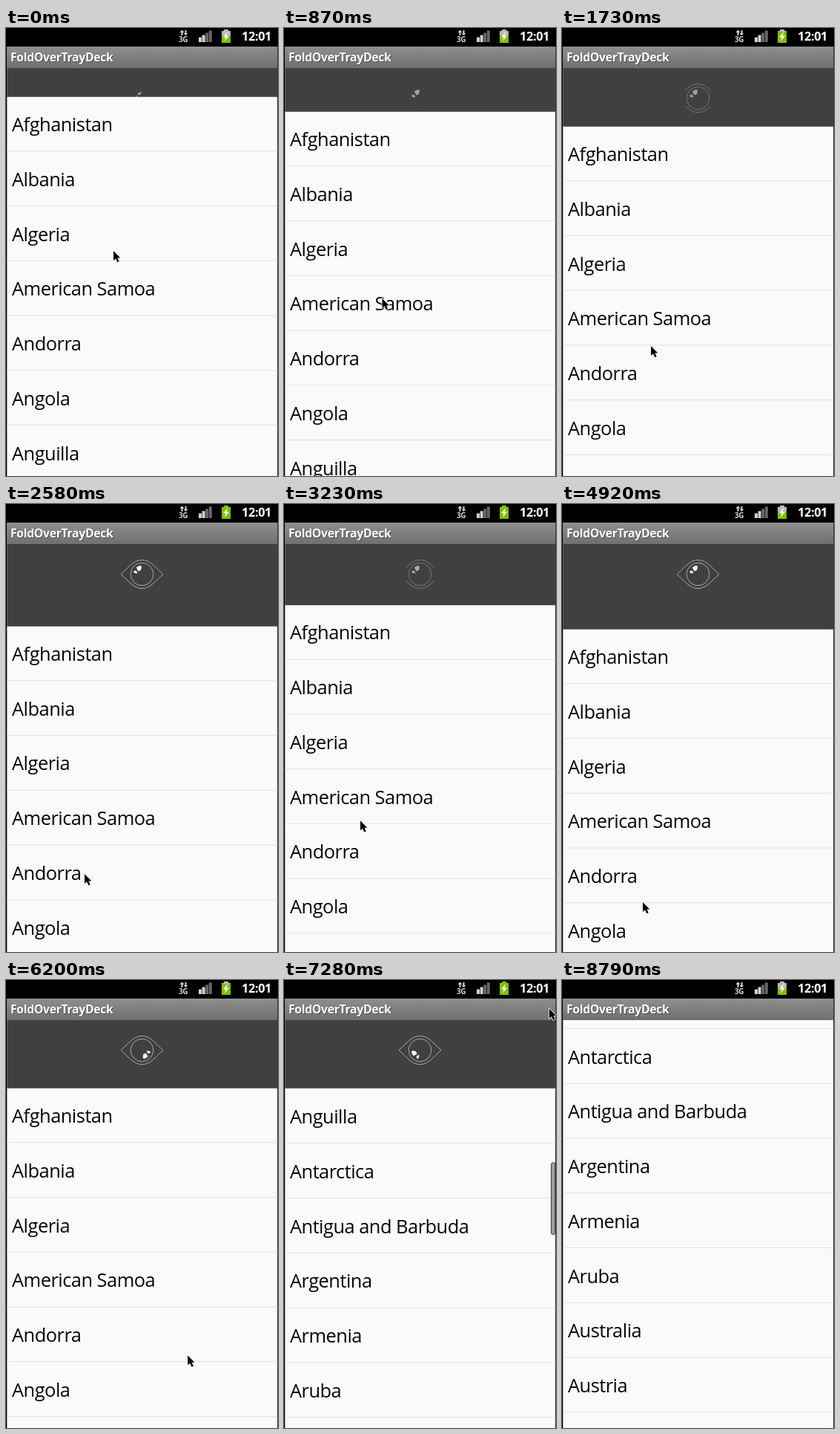
An HTML page for the animation above (9370 ms loop, 367x603 px).

```html
<!DOCTYPE html>
<html lang="en">
<head>
<meta charset="utf-8">
<title>Pull to refresh list</title>
<style>
  html, body { margin: 0; width: 100%; height: 100%; overflow: hidden; background: #000; }
  svg { display: block; }
  text { font-family: "Open Sans", "Noto Sans", sans-serif; }
  .bold { font-weight: 700; fill: #fff; letter-spacing: -.35px; }
  .title { font-size: 15.8px; }
  .shade { fill: #222; opacity: .5; }
  #rows text { font-size: 25.4px; letter-spacing: -.5px; fill: #050505; }
</style>
</head>
<body>
<svg width="367" height="603" viewBox="0 0 367 603">
  <defs>
    <linearGradient id="bar" x2="0" y2="1">
      <stop stop-color="#8f8f8f"/>
      <stop offset="1" stop-color="#6f6f6f"/>
    </linearGradient>
    <linearGradient id="thumbFill">
      <stop stop-color="#777"/>
      <stop offset=".5" stop-color="#b0b0b0"/>
      <stop offset="1" stop-color="#777"/>
    </linearGradient>
    <clipPath id="reveal"><circle id="iris" cx="183.5" cy="94.5"/></clipPath>
    <clipPath id="panel"><rect id="panelBox" y="54" width="367"/></clipPath>
  </defs>

  <rect width="367" height="603"/>
  <rect x="1.3" y="54" width="364.9" height="549" fill="#fafafa"/>
  <g id="rows"></g>

  <g clip-path="url(#panel)">
    <rect x="1.3" y="54" width="364.9" height="200" fill="#404040"/>
    <g id="eye" clip-path="url(#reveal)">
      <g fill="none" stroke="#b4b4b4" stroke-width=".9">
        <path d="M155 94.5C165 86 172 75.3 183.5 75.3S202 86 212 94.5C202 103 195 113.7 183.5 113.7S165 103 155 94.5Z"/>
        <circle cx="183.5" cy="94.5" r="15.3"/>
      </g>
      <path id="gleam" fill="#fff" d="M175.8 85.5L180.5 82.8L183 84L182 89L178.5 90.5ZM172 90.5L175.5 89.5L177.5 93.5L173 92.8Z"/>
    </g>
  </g>

  <rect id="thumb" x="360.5" width="5.3" height="97" rx="2.5" fill="url(#thumbFill)" stroke="#4a4a4a"/>

  <rect width="367" height="25"/>
  <rect x="1" y="25" width="365.5" height="29" fill="url(#bar)"/>
  <text x="7" y="46" class="bold title shade">FoldOverTrayDeck</text>
  <text x="6" y="45" class="bold title">FoldOverTrayDeck</text>

  <g fill="#d0d0d0">
    <path d="M236.5 10V6H234.5L237.5 2.5L240.5 6H238.5V10ZM241.5 3V7H239.8L242.5 10.3L245.2 7H243.5V3Z"/>
    <text x="233" y="19" font-size="10" font-weight="700" letter-spacing="-.4">3G</text>
    <path d="M260 12.5h4v6.5h-4zM264.6 9.5h4v9.5h-4z"/>
    <path fill="#666" d="M269.2 6.5h4v12.5h-4zM273.8 3.5h4v15.5h-4z"/>
  </g>
  <path fill="#bbb" d="M294 2h6v2h3v16h-12v-16h3z"/>
  <clipPath id="level"><rect id="levelBox" x="291" width="12" height="20"/></clipPath>
  <path clip-path="url(#level)" fill="#80bf00" d="M294 2h6v2h3v16h-12v-16h3z"/>
  <path fill="#fff" d="M299 5L293 12.5H296.5L295 18L301 10.5H297.5Z"/>
  <text x="318" y="17" class="bold" font-size="16.3">12:01</text>

  <path id="cursor" stroke="#fff" stroke-width="1.4" paint-order="stroke" d="M0 0V13L3 10.3L5.3 15.3L7.7 14.2L5.4 9.4H9.3Z"/>
</svg>
<script>
const LOOP = 9370, STEP = 214.4, LAST = 41, ROW = 73.75, TOP = 54;
const RELEASE = 5500, CHARGE = 4290;
const NAMES = ['Afghanistan', 'Albania', 'Algeria', 'American Samoa', 'Andorra', 'Angola', 'Anguilla',
  'Antarctica', 'Antigua and Barbuda', 'Argentina', 'Armenia', 'Aruba', 'Australia', 'Austria', 'Azerbaijan'];

// Pulling the list down, up and down again: [time, header height, cursor x, cursor y]
const DRAG = [[0, 38, 145, 300], [1715, 78, 120, 428], [2573, 110, 106, 498],
  [3650, 62, 101, 378], [4074, 71, 102, 407], [4931, 114, 109, 536]];

const $ = id => document.getElementById(id);
const set = (id, attrs) => { for (const k in attrs) $(id).setAttribute(k, attrs[k]); };
const clamp = (v, lo = 0, hi = 1) => Math.min(hi, Math.max(lo, v));
const span = (t, a, b) => clamp((t - a) / (b - a));
const mix = (a, b, p) => a + (b - a) * p;

function dragPose(t) {
  const i = DRAG.findIndex(k => k[0] > t);
  if (i < 0) return DRAG[DRAG.length - 1];
  const a = DRAG[i - 1], b = DRAG[i], p = span(t, a[0], b[0]);
  return a.map((v, j) => mix(v, b[j], p));
}

$('rows').innerHTML = NAMES.map((name, i) =>
  `<text x="8" y="${i * ROW + 47}">${name}</text>` +
  `<path d="M1.3 ${(i + 1) * ROW}H366.2" stroke="#e2e2e2"/>`).join('');

function draw(t) {
  const loading = t > RELEASE;
  const [, pulled, dragX, dragY] = dragPose(t);
  const settled = mix(pulled, 91, span(t, RELEASE, 5990));
  const h = settled * (1 - span(t, 8360, 8790)) ** 2;
  const scroll = Math.min(504.75, 441.5 * Math.max(0, t - 6500) / 790);
  const glide = span(t, RELEASE, 6420);

  set('rows', { transform: `translate(0 ${TOP + h - scroll})` });
  set('panelBox', { height: h && h + .8 });
  set('iris', { r: loading ? 40 : 8.5 + (h - 38) * .3 });
  set('eye', { opacity: loading ? 1 : clamp(.5 + (h - 78) / 54, .5, 1) });
  set('gleam', { transform: `rotate(${loading ? (t - RELEASE) * 630 / 1790 : 0} 183.5 94.5)` });
  set('thumb', { y: TOP + h + 1 + scroll * .226, opacity: span(t, 6500, 6630) - span(t, 7700, 8400) });
  set('cursor', { transform: `translate(${mix(dragX, 358, glide)} ${mix(dragY, 480, glide) - scroll})` });

  const phase = t % CHARGE;
  set('levelBox', { y: phase < 1280 ? 10 : phase < 2350 ? 5 : 1 });
}

// The screen refreshes in even holds, then rests on the last one.
function tick() {
  const t = performance.now() % LOOP;
  draw(Math.min(LAST, Math.floor((t + 15) / STEP)) * STEP);
  requestAnimationFrame(tick);
}
tick();
</script>
</body>
</html>
```
